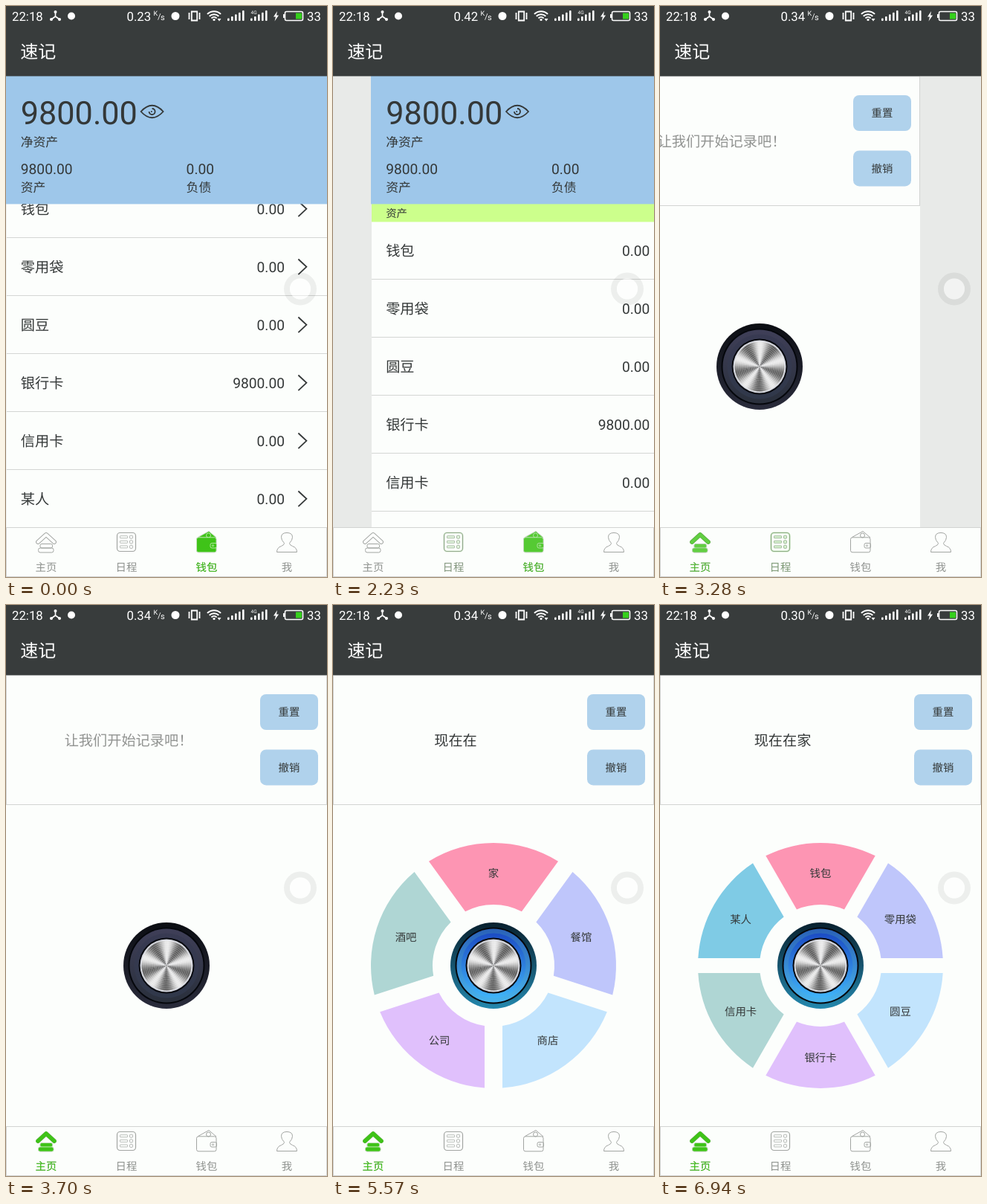
Recreate the animation shown at these times as an HTML page. Size 432 by 768 pixels, loop 8 s.

```html
<!DOCTYPE html>
<html lang="zh-CN">
<head>
<meta charset="utf-8">
<title>速记</title>
<style>
  @property --x { syntax: "<number>"; inherits: true; initial-value: 864; }
  html, body { margin: 0; width: 100%; height: 100%; overflow: hidden; background: #e8eae8; }
  svg { display: block; width: 432px; height: 768px; }
  text { font-family: Roboto, "Noto Sans CJK SC", "Noto Sans CJK", sans-serif; fill: #343838; white-space: pre; text-rendering: geometricPrecision; }
  .mid { text-anchor: middle; }
  .end { text-anchor: end; }
  .white text { fill: #fff; }
  .line { fill: none; stroke: #343838; stroke-width: 1.8; }
  .edge { stroke: #d2d4d2; fill: #fcfefc; }
  #strip { transform: translateX(calc(var(--x) * -1px)); }
  .menu { transform-origin: 216px 485px; }
  .off { stroke: #a2a5a2; fill: none; }
  .off text { fill: #8f928f; stroke: none; }
  .on { --d: calc(var(--x) / 432 - var(--i)); opacity: max(0, min(1 - var(--d), 1 + var(--d))); }
  .on text { fill: #3fc318; }
</style>
</head>
<body>
<svg id="stage" viewBox="0 0 432 768"></svg>
<script>
const LOOP = 8000;
const GREEN = '#3fc318';
const PINK = '#fd95b3', LAVENDER = '#bfc6fb', ICE = '#c2e4fd',
      PURPLE = '#e0c0fc', TEAL = '#afd6d4', SKY = '#7fcbe5';
// Type sizes, 1.2 stage pixels per unit
const SMALL = 14.4, NOTE = 16.8, BODY = 19.2, TITLE = 24, HUGE = 43.2;
const PAD = 19.2, COL = 242;

// y is the optical middle of the line
const text = (s, x, y, size, cls = '', more = '') =>
  `<text x="${x}" y="${y + size * .37}" font-size="${size}" class="${cls}" ${more}>${s}</text>`;
const rect = (x, y, w, h, fill, r = 0, more = '') =>
  `<rect x="${x}" y="${y}" width="${w}" height="${h}" rx="${r}" fill="${fill}" ${more}/>`;
const circle = (x, y, r, fill, more = '') =>
  `<circle cx="${x}" cy="${y}" r="${r}" fill="${fill}" ${more}/>`;
const path = (d, more = '') => `<path d="${d}" ${more}/>`;
const range = (n, fn) => Array.from({ length: n }, (_, i) => fn(i)).join('');
const grad = (id, from, to) => `<linearGradient id="${id}" x2="0" y2="1">
  <stop stop-color="${from}"/><stop offset="1" stop-color="${to}"/></linearGradient>`;

// Angles run clockwise from the top, in radians
const polar = (a, r) =>
  `${(216 + r * Math.sin(a)).toFixed(2)} ${(485 - r * Math.cos(a)).toFixed(2)}`;

// Ring slice whose sides stay parallel to the dividing spokes
function sector(a, b, gap) {
  const R = 165, r = 82, o = Math.asin(gap / R), i = Math.asin(gap / r);
  const large = b - a > Math.PI ? 1 : 0;
  return `M${polar(a + o, R)}A${R} ${R} 0 ${large} 1 ${polar(b - o, R)}` +
         `L${polar(b - i, r)}A${r} ${r} 0 ${large} 0 ${polar(a + i, r)}Z`;
}

function menu(id, slots, gap, items) {
  const step = 2 * Math.PI / slots;
  let a = -step / 2;
  const body = items.map(([label, fill, span = 1], n) => {
    const b = a + step * span, m = (a + b) / 2;
    const slice = path(sector(a, b, gap), `fill="${fill}" id="${id}${n}"`) +
      text(label, 216 + 124 * Math.sin(m), 485 - 124 * Math.cos(m), SMALL, 'mid');
    a = b;
    return slice;
  }).join('');
  return `<g id="${id}" class="menu">${body}</g>`;
}

function knob() {
  const rings = (id, outer, band, inner) => `<g id="${id}">` +
    circle(216, 485, 58, `url(#${outer})`) + circle(216, 485, 51.5, '#05070c') +
    circle(216, 485, 49.5, `url(#${band})`) +
    circle(216, 485, 43.5, `url(#${inner})`) + circle(216, 485, 37.5, '#080a10') + '</g>';
  const turn = 2 * Math.PI / 90;
  const metal = range(90, i => {
    const v = Math.round(162 + 72 * Math.cos(5 * i * turn));
    return path(`M216 485L${polar(i * turn, 33.5)}L${polar((i + 1.3) * turn, 33.5)}Z`,
      `fill="rgb(${v},${v},${v})"`);
  });
  const grooves = range(14, i => circle(216, 485, 2 + i * 2.4, 'none',
    'stroke="#fff" stroke-opacity=".28"'));
  return rings('dark', 'rimDark', 'bandDark', 'innerDark') +
    rings('lit', 'rimLit', 'bandLit', 'innerLit') +
    circle(216, 485, 35.5, '#d9dbe2') + metal + grooves;
}

function home() {
  const button = (label, y) => rect(342, y, 78, 48, '#b0d2ec', 8) + text(label, 381, y + 24, SMALL, 'mid');
  return rect(0, 94, 432, 608, '#fcfefc') +
    '<rect x=".5" y="94.5" width="431" height="174" class="edge"/>' +
    text('让我们开始记录吧！', 165, 181.5, BODY, 'mid', 'id="say0" style="fill:#919391"') +
    text('现在在', 165, 181.5, BODY, 'mid', 'id="say1"') +
    text('现在在家', 165, 181.5, BODY, 'mid', 'id="say2"') +
    button('重置', 120) + button('撤销', 194.4) +
    menu('when', 6, 10, [['今天', PINK], ['明天', LAVENDER], ['后天', ICE], ['现在', PURPLE], ['自定义时间', TEAL, 2]]) +
    menu('where', 5, 12, [['家', PINK], ['餐馆', LAVENDER], ['商店', ICE], ['公司', PURPLE], ['酒吧', TEAL]]) +
    menu('pay', 6, 10, [['钱包', PINK], ['零用袋', LAVENDER], ['圆豆', ICE], ['银行卡', PURPLE], ['信用卡', TEAL], ['某人', SKY]]) +
    knob();
}

function wallet() {
  const rows = ['钱包', '零用袋', '圆豆', '银行卡', '信用卡', '某人'].map((name, i) => {
    const y = 329 + 78 * i;
    return text(name, PAD, y, BODY) + text(i === 3 ? '9800.00' : '0.00', 374.4, y, BODY, 'end') +
      path(`M392.8 ${y - 10.5}l11 10.3l-11 10.3`, 'class="line"') +
      rect(0, y + 38, 432, 1, '#d4d6d4');
  }).join('');
  return rect(0, 94, 432, 608, '#fcfefc') +
    `<g id="list">${rect(0, 266, 432, 24.4, '#ccff8c')}${text('资产', PAD, 278.5, SMALL)}${rows}</g>` +
    rect(-1, 94, 433, 172.4, '#9ec7ea') +
    text('9800.00', PAD, 143.3, HUGE) + text('净资产', PAD, 183, NOTE) +
    text('9800.00', PAD, 219, BODY) + text('资产', PAD, 243.5, NOTE) +
    text('0.00', COL, 219, BODY) + text('负债', COL, 243.5, NOTE) +
    path('M181 142Q196 125.5 211 142Q196 158.5 181 142ZM192 142a4 4 0 1 0 4 -4M196 142h-1.5', 'class="line"');
}

function statusBar() {
  const bars = x => range(5, i => rect(x + i * 5, 16.5 - i * 2.6, 2.6, 3.5 + i * 2.6, '#fff', 1));
  const arc = r => `M${280 - r * .7} ${20 - r * .7}A${r} ${r} 0 0 1 ${280 + r * .7} ${20 - r * .7}`;
  return '<g class="white">' + rect(0, 0, 432, 94.4, '#383c3c') +
    text('22:18', 8, 13.3, NOTE) +
    path('M66.5 8V14L61 18M66.5 14L72 18', 'fill="none" stroke="#fff" stroke-width="1.6"') +
    circle(66.5, 8, 2, '#fff') + circle(61, 18, 2, '#fff') + circle(72, 18, 2, '#fff') +
    circle(88, 13.5, 5, '#fff') + circle(228, 13.5, 5.5, '#fff') +
    ['0.23', '0.42', '0.34', '0.30'].map((s, i) => text(s, 162.5, 13.3, NOTE, '', `id="rate${i}"`)).join('') +
    text('K', 198.5, 10, 9) + text('/', 204, 13.5, 11) + text('s', 208, 15, 11) +
    path('M249.8 7.5h7.4v12h-7.4zM246.5 9v9M260.5 9v9', 'fill="none" stroke="#fff" stroke-width="1.8"') +
    path(arc(5) + arc(9) + arc(13), 'fill="none" stroke="#fff" stroke-width="2"') +
    circle(280, 18.5, 1.6, '#fff') + path('M284.5 17h5l-2.5 3.5z', 'fill="#fff"') +
    bars(298) + bars(329) + text('4G', 329.5, 8.5, 6.5) +
    path('M365 7l-5 7.5h3l-1.5 6l5.5 -8h-3z', 'fill="#fff"') +
    rect(375.5, 7.5, 24, 12, 'none', 2, 'stroke="#fff" stroke-width="1.6"') +
    rect(373, 11, 2, 5, '#fff') + rect(390, 9.5, 8, 8, '#35d01c') +
    text('33', 405, 13.3, NOTE) + text('速记', PAD, 61, TITLE) + '</g>';
}

function tabBar() {
  const roof = (c, w) => path('M43 721L54 711L65 721',
    `fill="none" stroke="${c}" stroke-width="${w}" stroke-linecap="round" stroke-linejoin="round"`);
  const base = more => `<g ${more}><rect x="46" y="723.5" width="16.5" height="5.5" rx="2"/>` +
    '<rect x="43.5" y="729" width="20.5" height="6" rx="2.5"/></g>';
  const plan = (frame, fill, c) =>
    rect(149.5, 708.5, 25, 25, 'none', 4, `stroke="${c}" stroke-width="${frame}"`) +
    range(3, i => rect(153.5, 712.7 + i * 6.6, 10, 3, fill, .5, `stroke="${c}" stroke-width=".7"`) +
      rect(166.5, 712.2 + i * 6.6, 4, 4, fill, 1, `stroke="${c}" stroke-width=".8"`));
  const purse = more => `<g ${more}>` +
    path('M258.5 714.5L273 706.5L283 715') + '<circle cx="272.5" cy="712" r="3"/>' +
    '<rect x="256.5" y="714.8" width="26.5" height="20" rx="2.5"/>' +
    '<rect x="275" y="722.5" width="8.5" height="6.5" rx="2"/><circle cx="278.5" cy="725.7" r="1"/></g>';
  const man = path('M364.5 734.5q0 -6 6 -8q4 -1.5 4 -4q-4 -4 -4 -8q0 -6 7.5 -6' +
    'q7.5 0 7.5 6q0 4 -4 8q0 2.5 4 4q6 2 6 8z');
  const labels = ['主页', '日程', '钱包', '我'].map((s, i) => text(s, 54 + 108 * i, 755, SMALL, 'mid'));
  const active = [
    roof(GREEN, 5.5) + base(`fill="${GREEN}" stroke="#fcfefc" stroke-width=".5"`),
    plan(2.4, GREEN, GREEN),
    purse(`fill="${GREEN}" stroke="#fcfefc" stroke-width=".6"`),
  ].map((icon, i) => `<g class="on" style="--i:${i}">${icon}${labels[i]}</g>`).join('');
  return '<rect x=".5" y="701.5" width="431" height="66" class="edge"/>' +
    `<g class="off">${roof('#a2a5a2', 5.8)}${roof('#fcfefc', 4)}${base('')}` +
    `${plan(1.2, 'none', '#a2a5a2')}${purse('')}${man}${labels.join('')}</g>${active}`;
}

const stage = document.getElementById('stage');
stage.innerHTML = '<defs>' +
  grad('rimDark', '#0b0d12', '#2a2c3c') + grad('bandDark', '#3f3f58', '#2a303c') + grad('innerDark', '#383a52', '#30384a') +
  grad('rimLit', '#08202e', '#2488ae') + grad('bandLit', '#2a62b8', '#48b4ee') + grad('innerLit', '#1c4cc4', '#40b4f8') +
  '</defs>' + rect(0, 0, 432, 768, '#e8eae8') +
  `<g id="strip">${home()}` +
  text('这里什么也没有...', 648, 398, BODY, 'mid') +
  `<g transform="translate(864 0)">${wallet()}</g></g>` +
  statusBar() + tabBar() +
  circle(396, 380.5, 18, 'none', 'stroke="#000" stroke-opacity=".06" stroke-width="8"') +
  circle(396, 380.5, 14, '#fff', 'fill-opacity=".45"');

// Held values: each [ms, value] lasts until the next one
function track(el, prop, steps) {
  const frames = steps.map(([ms, v]) => ({ offset: ms / LOOP, [prop]: v, easing: 'step-end' }));
  frames.push({ offset: 1, [prop]: steps.at(-1)[1] });
  el.animate(frames, { duration: LOOP, iterations: Infinity });
}
const $ = id => document.getElementById(id);
function show(id, from, to = LOOP) {
  const steps = from ? [[0, 0], [from, 1]] : [[0, 1]];
  if (to < LOOP) steps.push([to, 0]);
  track($(id), 'opacity', steps);
}

track(stage, '--x', [
  [0, 863.4], [130, 864], [1920, 862], [2070, 847], [2230, 812], [2370, 690], [2490, 510], [2610, 438], [2730, 432],
  [3040, 390], [3160, 220], [3280, 82], [3430, 30], [3550, 6], [3700, 0],
]);
track($('list'), 'transform', [
  [0, 'translateY(-56px)'], [930, 'translateY(-20px)'], [1050, 'translateY(0px)'],
]);

show('rate0', 0, 130);
show('rate1', 130, 3160);
show('rate2', 3160, 6140);
show('rate3', 6140);

show('dark', 0, 4060);
show('lit', 4060);
show('when', 4060, 5010);
show('where', 5010, 6510);
show('pay', 6510);
track($('when'), 'transform', [[0, 'scale(1.03)'], [4180, 'scale(1)']]);
track($('when3'), 'fill', [[0, PURPLE], [4740, '#d8b0fb']]);
track($('where0'), 'fill', [[0, PINK], [6140, '#f886a8']]);

show('say0', 0, 5010);
show('say1', 5010, 6510);
show('say2', 6510);
</script>
</body>
</html>
```
